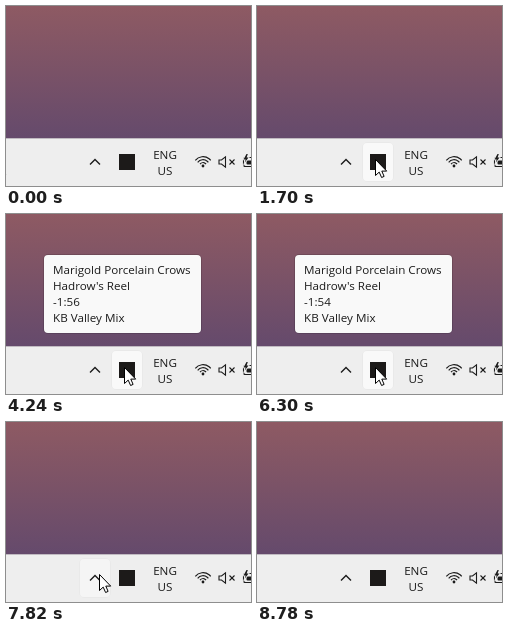
Animation, 245 px wide and 180 px high, one loop 8840 ms. Source, as an HTML page with a canvas:

```html
<!DOCTYPE html>
<html lang="en">
<head>
<meta charset="utf-8">
<title>Tray tooltip</title>
<style>
html, body { margin: 0; width: 100%; height: 100%; overflow: hidden; }
canvas { display: block; width: 245px; height: 180px; }
</style>
</head>
<body>
<canvas id="stage"></canvas>
<script>
const W = 245, H = 180, LOOP = 8840, STEP = 68.2;
const INK = '#1b1b1b', BAR = '#eeeeee';
const canvas = document.getElementById('stage');
const ctx = canvas.getContext('2d');
const dpr = window.devicePixelRatio || 1;
canvas.width = W * dpr;
canvas.height = H * dpr;

// Everything moves on one steady beat
const snap = t => 400 + Math.floor((t - 400) / STEP + 0.15) * STEP;
const ramp = (t, a, b) => Math.max(0, Math.min(1, (t - a) / (b - a)));
const pulse = (t, a, b, c, d) => ramp(t, a, b) * (1 - ramp(t, c, d));
const mix = (a, b, k) => a + (b - a) * k;

// Pointer tip: glide in, drift back over the chevron, slide out
function pointerAt(t) {
  const enter = 1 - (1 - ramp(t, 400, 1700)) ** 2.3;
  const back = ramp(t, 7290, 8170) ** 1.18;
  const exit = ramp(t, 8170, 8780);
  const x = mix(-12, 118, enter) - 52 * back - 80 * exit;
  const y = mix(156, 153, enter) - 4 * back ** 2;
  return [Math.round(x), Math.round(y)];
}

function box(x, y, w, h, r, fill) {
  ctx.beginPath();
  ctx.roundRect(x, y, w, h, r);
  ctx.fillStyle = fill;
  ctx.fill();
}

function poly(points, close) {
  ctx.beginPath();
  points.forEach(([x, y]) => ctx.lineTo(x, y));
  if (close) ctx.closePath();
}

function line(...points) {
  poly(points);
  ctx.stroke();
}

function text(s, x, y, align = 'left') {
  ctx.font = '11.65px "Open Sans", "Noto Sans", sans-serif';
  ctx.textAlign = align;
  ctx.fillStyle = INK;
  ctx.fillText(s, x, y);
}

// Rounded surface with a thin dark rim outside it
function panel(x, y, w, h, fill, rim) {
  ctx.beginPath();
  ctx.roundRect(x - 0.5, y - 0.5, w + 1, h + 1, 4.5);
  ctx.strokeStyle = `rgba(0, 0, 0, ${rim})`;
  ctx.lineWidth = 1;
  ctx.stroke();
  box(x, y, w, h, 4, fill);
}

function fade(alpha, draw) {
  if (alpha <= 0) return;
  ctx.globalAlpha = alpha;
  draw();
  ctx.globalAlpha = 1;
}

function tooltip(alpha, x, y, w, lines) {
  fade(alpha, () => {
    panel(x, y, w, 14 + 16 * lines.length, '#f9f9f9', 0.14);
    lines.forEach((s, i) => text(s, x + 9, y + 19 + 16 * i));
  });
}

function hover(alpha, x, fill) {
  fade(alpha, () => panel(x, 137, 30, 38, fill, 0.02));
}

function backdrop() {
  const g = ctx.createLinearGradient(0, 0, 0, 132);
  g.addColorStop(0, '#8e5a63');
  g.addColorStop(0.5, '#7a5267');
  g.addColorStop(1, '#654a6c');
  ctx.fillStyle = g;
  ctx.fillRect(0, 0, W, 132);
  ctx.fillStyle = BAR;
  ctx.fillRect(0, 132, W, 48);
  ctx.fillStyle = '#c0bac1';
  ctx.fillRect(0, 132, W, 1);
}

function wifi() {
  ctx.lineWidth = 1.2;
  for (const r of [3.8, 6.8, 9.8]) {
    ctx.beginPath();
    ctx.arc(197, 160.5, r, -Math.PI / 2 - 0.9, -Math.PI / 2 + 0.9);
    ctx.stroke();
  }
  ctx.beginPath();
  ctx.arc(197, 160, 1.4, 0, 7);
  ctx.fill();
}

function speaker() {
  ctx.lineWidth = 1.1;
  poly([[213, 154], [215.5, 154], [219.5, 150.8], [219.5, 161.2], [215.5, 158], [213, 158]], true);
  ctx.stroke();
  line([223.5, 153.5], [228.5, 158.5]);
  line([228.5, 153.5], [223.5, 158.5]);
}

function battery() {
  ctx.lineWidth = 1.1;
  ctx.beginPath();
  ctx.roundRect(237.5, 151.5, 16, 9, 2);
  ctx.stroke();
  box(240.5, 154.5, 12, 4, 1, INK);
  poly([[240.5, 148], [237.5, 153.4], [239.7, 153.4], [238.8, 156.5], [242.5, 151.5], [240.6, 151.5], [241.8, 148]], true);
  ctx.strokeStyle = BAR;
  ctx.lineWidth = 1.6;
  ctx.stroke();
  ctx.fill();
}

function tray(t) {
  hover(pulse(t, 900, 1030, 1220, 1340), 74, '#f5f5f5');
  hover(pulse(t, 7540, 7630, 8110, 8250), 74, '#f5f5f5');
  hover(pulse(t, 1230, 1400, 7540, 7630), 106, '#f9f9f9');
  ctx.strokeStyle = INK;
  ctx.lineWidth = 1.4;
  line([84, 158.5], [89, 153.5], [94, 158.5]);
  box(113, 148, 16, 16, 0, '#1c1a19');
  text('ENG', 159, 153, 'center');
  text('US', 159, 169, 'center');
  wifi();
  speaker();
  battery();
}

function pointer(x, y) {
  ctx.save();
  ctx.translate(x + 0.5, y + 0.5);
  poly([[0, 0], [0, 16], [3.7, 12.6], [6.1, 18], [8.6, 16.9], [6.3, 11.6], [11.2, 11.6]], true);
  ctx.fillStyle = '#fff';
  ctx.fill();
  ctx.strokeStyle = '#000';
  ctx.lineWidth = 1;
  ctx.stroke();
  ctx.restore();
}

function draw(now) {
  const clock = now % LOOP;
  const t = snap(clock);
  const left = 58 - Math.max(0, Math.floor((clock - 2230) / 1000));
  ctx.setTransform(dpr, 0, 0, dpr, 0, 0);
  backdrop();
  tray(t);
  tooltip(pulse(t, 2120, 2305, 7550, 7740), 38, 41, 157,
    ['Marigold Porcelain Crows', "Hadrow's Reel", '-1:' + left, 'KB Valley Mix']);
  tooltip(pulse(t, 7990, 8160, 8200, 8370), 19, 89, 121, ['Show hidden icons']);
  pointer(...pointerAt(t));
}

let start;
function tick(now) {
  start ??= now;
  draw(Math.max(0, now - start));
  requestAnimationFrame(tick);
}
draw(0);
requestAnimationFrame(tick);
</script>
</body>
</html>
```
